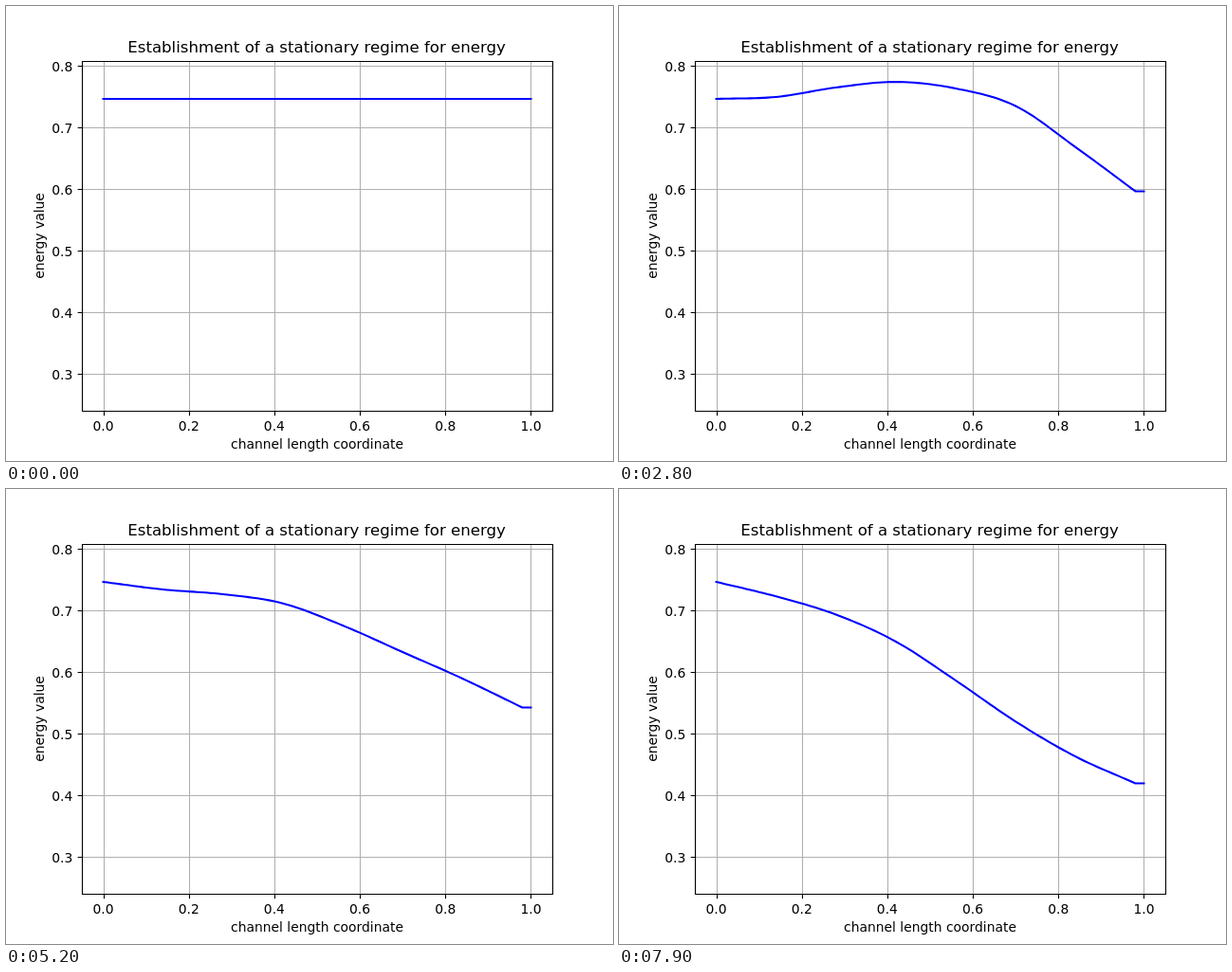
An HTML page that plays this animation: 640 by 480 pixels, repeating every 8000 ms.

```html
<!DOCTYPE html>
<html lang="en">
<head>
<meta charset="utf-8">
<title>Establishment of a stationary regime for energy</title>
<style>
html, body { margin: 0; width: 100%; height: 100%; overflow: hidden; background: #fff; }
svg { display: block; }
text { font: 13.89px "DejaVu Sans", sans-serif; }
.title { font-size: 16.6px; }
.mid { text-anchor: middle; }
.end { text-anchor: end; }
path { fill: none; stroke: #000; stroke-width: 1.11; }
#grid { stroke: #b0b0b0; }
#curve { stroke: #00f; stroke-width: 2.08; stroke-linecap: square; stroke-linejoin: round; }
</style>
</head>
<body>
<svg width="640" height="480" viewBox="0 0 640 480">
  <path id="grid"/>
  <path id="ticks"/>
  <path id="curve"/>
  <path d="M80.5 58.5H576.5V427.5H80.5Z" stroke-linecap="square"/>
  <g id="labels"></g>
  <text class="title mid" x="327.6" y="49">Establishment of a stationary regime for energy</text>
  <text class="mid" x="328" y="467">channel length coordinate</text>
  <text class="mid" transform="translate(40 242.5) rotate(-90)">energy value</text>
</svg>
<script>
const LOOP = 8000, STEP = 100, START = 98, FIRST = 800, OUTLET = .98;
const byId = id => document.getElementById(id);

// Key poses: heights at even stations from just after the inlet to the outlet.
const poses = {
  800: [89, 86.6, 91.8, 97.8, 102.2, 105.2, 126],
  2000: [92.5, 80.3, 74.3, 85, 102.5, 137, 172],
  3600: [99.6, 95.1, 93, 97.5, 115.7, 160, 213],
  5200: [106, 111, 120.7, 144, 172, 200, 230.5],
  6300: [109, 121, 139.5, 170.5, 206, 237, 264],
  7900: [113.3, 132.5, 161, 202, 245.3, 282.2, 310.5]
};
const times = [0, ...Object.keys(poses).map(Number)];
const stations = Array.from({ length: 8 }, (_, i) => OUTLET * i / 7);
const paths = stations.map((_, i) =>
  [START, ...Object.values(poses).map(p => i ? p[i - 1] : START)]);

// Smooth curve through unevenly spaced points.
function spline(px, py, x) {
  const last = px.length - 2;
  let i = 0;
  while (i < last && x > px[i + 1]) i++;
  const gap = k => px[k + 1] - px[k];
  const rise = k => (py[k + 1] - py[k]) / gap(k);
  const slope = k => k === 0 ? rise(0) : k > last ? rise(last)
    : (rise(k - 1) * gap(k) + rise(k) * gap(k - 1)) / (gap(k - 1) + gap(k));
  const h = gap(i), s = (x - px[i]) / h, r = 1 - s;
  return py[i] * r * r * (1 + 2 * s) + py[i + 1] * s * s * (3 - 2 * s)
    + h * s * r * (slope(i) * r - slope(i + 1) * s);
}

// Early on, two waves spread inwards from the ends of the channel.
function spread(x, u) {
  const left = .22 * u, right = 1 - .2 * u;
  if (x < left) return x / u;
  if (x > right) return 1 - (1 - x) / u;
  return .22 + .58 * (x - left) / (right - left);
}

function curvePath(time) {
  const u = Math.min(1, time / FIRST);
  const heights = paths.map(p => spline(times, p, Math.max(FIRST, time)));
  const points = Array.from({ length: 101 }, (_, i) => {
    const x = i / 100;
    // The curve is level past the outlet.
    const y = spline(stations, heights, Math.min(OUTLET, spread(x, u)));
    return `${102.55 + 450.9 * x} ${START + u * (y - START)}`;
  });
  return "M" + points.join("L");
}

let grid = "", ticks = "", labels = "";
for (let i = 0; i < 6; i++) {
  const x = 102.545 + 90.182 * i, gx = Math.round(x) + .5, gy = 63.5 + 65 * i;
  grid += `M${gx} 58V427M80 ${gy}H576`;
  ticks += `M${gx} 427.5v4.86M80.5 ${gy}h-4.86`;
  labels += `<text class="mid" x="${x}" y="448">${(i / 5).toFixed(1)}</text>`
    + `<text class="end" x="70.3" y="${gy + 5}">${(.8 - i / 10).toFixed(1)}</text>`;
}
byId("grid").setAttribute("d", grid);
byId("ticks").setAttribute("d", ticks);
byId("labels").innerHTML = labels;

const curve = byId("curve");
let begin;
function draw(now) {
  begin ??= now;
  const time = Math.floor((now - begin) % LOOP / STEP) * STEP;
  curve.setAttribute("d", curvePath(time));
  requestAnimationFrame(draw);
}
requestAnimationFrame(draw);
</script>
</body>
</html>
```
